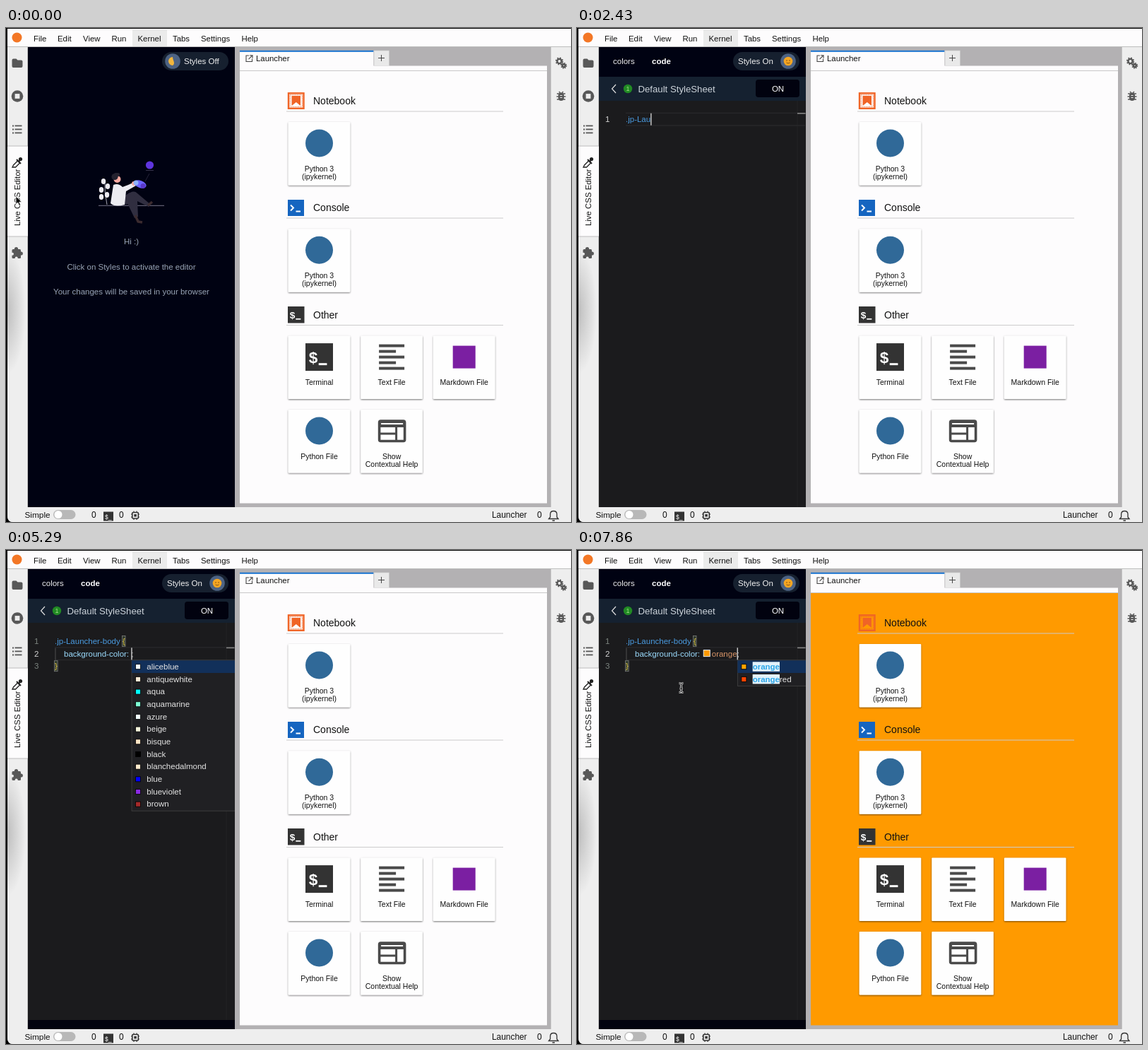
Animation, 800 px wide and 699 px high, one loop 8 s. Source, as an HTML page:

```html
<!DOCTYPE html>
<html lang="en">
<head>
<meta charset="utf-8">
<title>Live CSS Editor</title>
<style>
html, body { margin: 0; width: 100%; height: 100%; overflow: hidden; background: #000; }
svg { display: block; width: 800px; height: 699px; font-family: "Liberation Sans", Arial, sans-serif; font-size: 11.5px; }
text { white-space: pre; }
</style>
</head>
<body>
<svg id="stage" viewBox="0 0 800 699"></svg>
<script>
const LOOP = 8000;
const SIZE = 11.5;
const stage = document.getElementById('stage');
const pen = document.createElement('canvas').getContext('2d');

const rect = (x, y, w, h, fill, extra = '') =>
  `<rect x="${x}" y="${y}" width="${w}" height="${h}" fill="${fill}" ${extra}/>`;
const circle = (x, y, r, fill, extra = '') => `<circle cx="${x}" cy="${y}" r="${r}" fill="${fill}" ${extra}/>`;
const label = (x, y, s, fill, extra = '') => `<text x="${x}" y="${y}" fill="${fill}" ${extra}>${s}</text>`;
const line = (d, stroke, width = 1, extra = '') =>
  `<path d="${d}" fill="none" stroke="${stroke}" stroke-width="${width}" ${extra}/>`;
const shape = (d, fill, extra = '') => `<path d="${d}" fill="${fill}" ${extra}/>`;
const middle = 'text-anchor="middle"';
const size = n => `font-size="${n}"`;

function widthOf(s, bold) {
  pen.font = `${bold ? 'bold ' : ''}${SIZE}px "Liberation Sans", Arial, sans-serif`;
  return pen.measureText(s).width;
}

// ---- window frame ----
function menuBar() {
  const items = [['File', 39], ['Edit', 73], ['View', 109], ['Run', 149.5], ['Kernel', 186.5],
    ['Tabs', 236], ['Settings', 276], ['Help', 333.5]];
  return rect(1, 1, 799, 25, '#fdfcfd') + rect(179, 2, 49, 24, '#ebebeb') +
    circle(15.5, 13.5, 7, '#f37726') +
    items.map(([s, x]) => label(x, 18.5, s, '#111', size(11.4))).join('') +
    rect(1, 26, 799, 1, '#bdbdbd');
}

function gear(x, y, r) {
  return circle(x, y, r, 'none', 'stroke="#555" stroke-width="2.4"') +
    circle(x, y, r + 1.6, 'none', `stroke="#555" stroke-width="1.8" stroke-dasharray="${(r + 1.6) * Math.PI / 8}"`);
}

function sideBars() {
  const ink = '#585858';
  const left =
    rect(1, 27, 30, 651, '#eee') + rect(1, 290, 29, 200, 'url(#shade)') +
    rect(30, 27, 1, 651, '#c4c4c4') +
    rect(1, 167, 30, 128, '#fdfcfd') + rect(1, 166.5, 30, 1, '#bdbdbd') + rect(1, 294.5, 30, 1, '#bdbdbd') +
    shape('M8.5 45.5q0-2 2-2h4l2 2h5q2 0 2 2v6.5q0 2-2 2h-11q-2 0-2-2z', ink) +
    circle(16, 96.5, 8.3, ink) + rect(12.6, 93.1, 6.8, 6.8, '#eee') +
    [138.5, 143.5, 148.5].map(y => rect(9, y - 1, 2, 2, ink) + rect(12.5, y - 1, 10, 1.8, ink)).join('') +
    line('M9 197l1.5-3 6-6 3 3-6 6z', '#222', 1.3) + line('M15 186l6 6M17.5 189.5l3-3', '#222', 2) +
    circle(20.5, 185.5, 2.6, '#222') +
    `<text transform="translate(20 280) rotate(-90)" fill="#111" font-size="11.4">Live CSS Editor</text>` +
    rect(8.5, 313, 12.5, 13, ink, 'rx="1.5"') + circle(14.5, 312.6, 2.6, ink) + circle(21.3, 319, 2.6, ink) +
    circle(9, 319.8, 2, '#eee') + circle(14.7, 325.6, 2, '#eee');
  const right = rect(771, 27, 29, 651, '#eee') + rect(771, 27, 1, 651, '#c4c4c4') +
    gear(783.5, 47, 3.1) + gear(789.8, 53.3, 2) +
    line('M780 93h12M779.5 97h13M780 101h12M783 90l2 2M789 90l-2 2', ink, 1.5) +
    rect(782, 91.5, 8, 11.5, ink, 'rx="4"') + line('M784.5 95.5h3M784.5 98.5h3', '#eee', 1.2);
  return left + right;
}

function statusBar() {
  return rect(1, 678, 799, 21, '#eee') +
    label(26.5, 693, 'Simple', '#111', size(11.8)) +
    rect(67, 682, 31.5, 13, '#b8b8b8', 'rx="6.5"') + circle(74, 688.5, 5.5, '#fff') +
    label(121, 693, '0', '#111', size(12)) + rect(138, 684.5, 14, 13, '#333') +
    label(140, 694.5, '$_', '#fff', size(8.5)) +
    label(160, 693, '0', '#111', size(12)) +
    rect(178.8, 685.5, 8.5, 8.5, 'none', 'stroke="#333" stroke-width="1.6" rx="1"') +
    rect(181.3, 688, 3.5, 3.5, '#333') +
    line('M181 683.5v2M185 683.5v2M181 694v2M185 694v2M177 688h2M177 692h2M187 688h2M187 692h2', '#333', 1.2) +
    label(688, 693, 'Launcher', '#111', size(11.9)) + label(752, 693, '0', '#111', size(12)) +
    line('M768.5 694.5h13.5l-2-2.5v-4q0-4.5-4.7-4.5t-4.7 4.5v4z', '#333', 1.3) +
    line('M773.5 697h3.5', '#333', 1.5);
}

// ---- launcher ----
const prompt = (x, y, s) => rect(x, y, s, s, '#333') +
  label(x + s * 0.12, y + s * 0.72, '$', '#fff', `font-size="${s * 0.58}" font-weight="bold"`) +
  rect(x + s * 0.48, y + s * 0.72, s * 0.3, s * 0.075, '#fff');

const icons = {
  python: (x, y) => circle(x, y, 19.5, '#306998'),
  terminal: (x, y) => prompt(x - 19.5, y - 19.5, 39),
  textFile: (x, y) => [0, 1, 2, 3, 4].map(i => rect(x - 18, y - 18 + i * 8, i % 2 ? 24 : 36, 4, '#4a4a4a')).join(''),
  markdown: (x, y) => rect(x - 16, y - 16, 32, 32, '#7b1fa2'),
  help: (x, y) => rect(x - 17.5, y - 14, 36, 28.5, '#fff', 'rx="2" stroke="#4a4a4a" stroke-width="3.6"') +
    rect(x - 18, y - 14, 37, 9, '#4a4a4a') + rect(x - 15, y - 11, 31, 2, '#fff') +
    line(`M${x - 17} ${y + 4}h23M${x + 6.5} ${y - 7}v21`, '#4a4a4a', 3)
};

function card(col, y, icon, lines) {
  const x = 399.7 + col * 102.6, cx = x + 43.8;
  return rect(x, y, 87.5, 89.5, '#fefefe', 'rx="1" filter="url(#lift)"') + icons[icon](cx, y + 30) +
    lines.map((s, i) => label(cx, y + 69.5 + i * 11.5, s, '#111', `${middle} ${size(10.5)}`)).join('');
}

function heading(y, s) {
  return label(435, y + 5, s, '#111', size(14)) + rect(397, y + 14.5, 307, 1, '#ccc');
}

function launcher() {
  const frame = rect(324, 27, 447, 651, '#b3b1b3') +
    rect(331, 32, 189.5, 23, '#fdfcfd') + rect(331, 31.8, 189.5, 2, '#1a73d0') +
    rect(521, 32, 21.5, 21.5, '#e9e9e9', 'stroke="#c8c8c8" stroke-width=".7"') +
    line('M527 42.5h9M531.5 38v9', '#444', 1) +
    line('M344 39h-4v8.5h8.5v-4M345 38.7h4v4M349 38.7l-5.5 5.5', '#444', 1.1) +
    label(354, 47, 'Launcher', '#111', size(11.4)) +
    rect(331, 53.5, 435, 7.5, '#fdfcfd') + rect(331, 60, 435, 1, '#c8c8c8');
  const body = `<rect id="body" x="331" y="61" width="435" height="611.5"/>`;
  const notebook = rect(400, 92.3, 21.5, 21.5, 'none', 'stroke="#f06426" stroke-width="2.4"') +
    rect(402.3, 94.6, 17, 17, 'none', 'stroke="#f06426" stroke-width="1" stroke-dasharray="1.2 1.2"') +
    shape('M404.5 96h12.5v14l-6.2-5-6.3 5z', '#f06426');
  const console = rect(399, 243, 23, 23, '#1565c0') + line('M403 250.5l4 4-4 4M410.5 259.5h6.5', '#fff', 1.9);
  return frame + body +
    notebook + heading(103, 'Notebook') + card(0, 133, 'python', ['Python 3', '(ipykernel)']) +
    console + heading(254, 'Console') + card(0, 284.3, 'python', ['Python 3', '(ipykernel)']) +
    prompt(399, 394, 23.5) + heading(405.5, 'Other') +
    card(0, 435.6, 'terminal', ['Terminal']) + card(1, 435.6, 'textFile', ['Text File']) +
    card(2, 435.6, 'markdown', ['Markdown File']) +
    card(0, 540, 'python', ['Python File']) + card(1, 540, 'help', ['Show', 'Contextual Help']);
}

// ---- left panel ----
function welcome() {
  const leaf = (x, y) => `<ellipse cx="${x}" cy="${y}" rx="3.2" ry="4" fill="#eceaf0"/>`;
  const art = line('M131 251.3h93', '#777588', 1) +
    line('M143 250q-4-18-3-34', '#cfcdd6', 0.8) +
    leaf(138, 217) + leaf(144, 224) + leaf(135, 229) + leaf(143, 236) + leaf(135, 239) +
    shape('M171 237q9-9 15-3l19 16-3 3-16-8 1 22-5 2-12-25z', '#302e40') +
    shape('M157 250q24 1 29-9l-11-8-9 6z', '#302e40') +
    line('M183 265l4 9 6 1M201 251l6-5', '#3b2b2f', 3.5) +
    shape('M152 222q7-3 13 3l8-3 9-4 2 5-14 8-2 19q-14 4-20-2z', '#ececf1') +
    circle(157.5, 214, 5, '#f7a9a0') + circle(154, 210.5, 4.6, '#24222f') + rect(153, 205, 8, 5, '#24222f', 'rx="2"') +
    circle(181, 220, 3, '#f7a9a0') +
    `<ellipse cx="190" cy="221" rx="9" ry="5" fill="#6c63ff" transform="rotate(20 190 221)"/>` +
    circle(184, 219, 3.5, '#8fb2ff') + circle(194, 223.5, 3.5, '#5a38c8') +
    circle(203.5, 194, 5.6, '#5f35dd') + line('M198 201.5h11', '#35334a', 1) + line('M203 206l-6 11', '#35334a', 0.7);
  const say = (y, s) => label(177.5, y, s, '#98a4b4', middle);
  return art + say(306, 'Hi :)') + say(341.5, 'Click on Styles to activate the editor') +
    say(376.5, 'Your changes will be saved in your browser');
}

function editorHeader() {
  return label(51, 51, 'colors', '#eee') + label(106, 51, 'code', '#fff', 'font-weight="bold"') +
    rect(31, 69, 293, 34, '#152130') + line('M55 80l-5.5 6 5.5 6', '#ddd', 1.2) +
    circle(72, 86, 6.2, '#218a24') + label(72, 89.3, '1', '#a8e08a', `${middle} ${size(9)}`) +
    label(86.5, 90.5, 'Default StyleSheet', '#ccd3da', size(13.2)) +
    rect(253, 73, 62, 25, '#01020f', 'rx="4"') + label(284.5, 90, 'ON', '#fff', middle) +
    rect(31, 103, 293, 575, '#1b1b1d') + rect(311.5, 103, 1, 575, '#242426');
}

function toggle(on, p) {
  const x = 236 + 63 * p;
  const face = on
    ? circle(x, 47, 6.3, '#f5a623') + circle(x - 2, 46, 0.8, '#7a4a10') + circle(x + 2, 46, 0.8, '#7a4a10') +
      line(`M${x - 2.5} 49q2.5 2 5 0`, '#7a4a10', 0.9)
    : shape(`M${x} 41a6 6 0 0 0 0 12q3-2 1.5-6t-1.5-6z`, '#f2b63c');
  return rect(221, 34, 94, 26, '#16202f', 'rx="13"') +
    label(252 - 24 * p, 51, on ? 'Styles On' : 'Styles Off', '#f2f2f2') +
    circle(x, 47, 10.8, '#4d6384') + face;
}

// ---- typing script ----
const SWITCH = 1480;
const SELECTOR = '.jp-Launcher-body';
const PROPERTY = 'background-color';
const properties = ['border', 'background-color', 'background', 'box-sizing', 'border-radius', 'bottom', 'box-shadow',
  'background-image', 'border-bottom', 'background-position', 'border-top', 'border-color'];
const colors = ['aliceblue', 'antiquewhite', 'aqua', 'aquamarine', 'azure', 'beige', 'bisque', 'black',
  'blanchedalmond', 'blue', 'blueviolet', 'brown'];
const warm = ['oldlace', 'olive', 'olivedrab', 'orange', 'orangered', 'orchid'];

const steps = [];
function at(time, change) {
  steps.push({ head: '', brace: false, open: false, prop: '', value: '', list: null, match: '', pick: 0,
    ...steps[steps.length - 1], ...change, time });
}
at(SWITCH, {});
for (let i = 1; i <= SELECTOR.length; i++) at(1750 + i * 97, { head: SELECTOR.slice(0, i) });
at(3620, { head: SELECTOR + ' ' });
at(3820, { brace: true });
at(4070, { open: true });
at(4320, { prop: 'b' });
at(4390, { list: properties, match: 'b' });
at(4830, { pick: 1 });
at(5130, { prop: PROPERTY + ': ', list: null, match: '', pick: 0 });
at(5240, { list: colors });
for (let i = 1; i <= 6; i++) {
  const value = 'orange'.slice(0, i);
  at(5290 + i * 135, { value, match: value, list: warm.filter(c => c.startsWith(value)) });
}

const FIRST_KEY = steps[1].time;
const LAST_KEY = steps[steps.length - 1].time;
const SWATCH = LAST_KEY + 1000;
const BLINK = 600;
const rowY = i => 133 + i * 17.6;

function bracket(x, row, s) {
  return rect(x - 0.5, rowY(row) - 11.5, 4.6, 15, '#2f3a2c', 'stroke="#7d7d7d" stroke-width=".8"') +
    label(x, rowY(row), s, '#e8c84a');
}

function suggestions(step, x) {
  const isColor = step.list !== properties, h = 17.68;
  const rows = step.list.map((name, i) => {
    const y = 156.3 + i * h, tx = x + (isColor ? 21.3 : 20), m = step.match;
    const mw = widthOf(m, true);
    const mark = isColor
      ? rect(x + 5.5, y + 5.4, 7, 7, name, 'stroke="#000" stroke-width=".8"')
      : line(`M${x + 4.5} ${y + 13.5}l6-6`, '#d0d0d0', 3) + line(`M${x + 4.7} ${y + 13.3}l5.5-5.5`, '#222', 1) +
        line(`M${x + 14} ${y + 6.5}a3 3 0 1 1-3-3l-.5 2.7z`, '#d0d0d0', 1.1);
    return (i === step.pick ? rect(x, y, 330 - x, h, '#12305a') : '') + mark +
      (m ? rect(tx, y + 2, mw, 13.5, '#e3f2fb') + label(tx, y + 12.7, m, '#2ba6e8', 'font-weight="bold"') : '') +
      label(tx + (m ? mw : 0), y + 12.7, name.slice(m.length), '#e4e4e4');
  }).join('');
  return rect(x, 156, 330 - x, step.list.length * h + 1, '#202023', 'stroke="#444" stroke-width=".8"') + rows;
}

function editor(t) {
  const step = steps.filter(s => s.time <= t).pop();
  const { head, brace, open, prop, value } = step;
  const active = open ? 1 : 0;
  const y = rowY(active);
  let out = line(`M69 ${y - 12.7}H323M69 ${y + 5}H323`, '#2c2c2f', 1);
  if (head) out += rect(312, y - 13, 11.5, 1.6, '#858585');
  for (let i = 0; i < (open ? 3 : 1); i++) out += label(40, rowY(i), i + 1, i === active ? '#d4d4d4' : '#7d8580');
  out += label(69, rowY(0), head, '#4a9be0');
  const headEnd = 69 + widthOf(head);
  if (brace) out += bracket(headEnd, 0, '{') + (open ? bracket(69, 2, '}') : bracket(headEnd + 4, 0, '}'));
  let caret = headEnd + (brace ? 4 : 0);
  if (open) {
    const swatch = t >= SWATCH ? 13.5 : 0;
    const valueX = 82 + widthOf(prop);
    caret = valueX + swatch + widthOf(value);
    out += rect(69.5, y - 12, 0.9, 17, '#555') + rect(31, 665, 293, 13, '#02030f') +
      label(82, y, prop, prop === 'b' ? '#d4d4d4' : '#9cdcfe') +
      label(valueX + swatch, y, value, '#d79467');
    if (prop.includes(':')) out += label(caret, y, ';', '#d4d4d4');
    if (swatch) out += rect(valueX + 2, y - 9, 9, 9, '#ff9a00', 'stroke="#eee" stroke-width="1"');
  }
  if (step.list) out += suggestions(step, caret + 0.8);
  if (Math.floor((t - step.time) / BLINK) % 2 === 0) out += rect(caret, y - 12.3, 1.4, 17, '#d0d0d0');
  return out;
}

// ---- pointer ----
const ease = p => p * p * (3 - 2 * p);
const progress = (t, from, to) => Math.min(1, Math.max(0, (t - from) / (to - from)));
const beam = 'M-3-6.5q3 0 3 2v9q0 2-3 2M3-6.5q-3 0-3 2v9q0 2 3 2M-2 1h4';

const pointers = {
  arrow: shape('M0 0v11.5l2.7-2.5 2 4.5 2-1-2-4.3h3.7z', '#000', 'stroke="#fff" stroke-width=".9"'),
  hand: shape('M3 1.5q1.7-1 2 .7v4l5 1q1.5.5 1.3 2.300l-.8 4.5h-6l-4-5q0-1.7 1.7-1l1 .8z', '#fff', 'stroke="#000" stroke-width="1.1"'),
  beam: line(beam, '#fff', 2.6) + line(beam, '#000', 1)
};

// Typing hides the pointer until the mouse moves again.
function pointer(t) {
  if (t >= FIRST_KEY && t < 7350) return '';
  const p = t < FIRST_KEY ? 1 - ease(progress(t, 200, 1220)) : ease(progress(t, 7350, 7860));
  const [toX, toY] = t < FIRST_KEY ? [14, 238] : [147.5, 195];
  const x = 250 + (toX - 250) * p, y = 43 + (toY - 43) * p;
  const kind = x > 221 && y < 60 ? 'hand' : t > FIRST_KEY && y > 103 ? 'beam' : 'arrow';
  return `<g transform="translate(${x} ${y})">${pointers[kind]}</g>`;
}

// ---- assembly ----
stage.innerHTML = `<defs>
  <radialGradient id="shade" gradientUnits="userSpaceOnUse" cx="0" cy="0" r="1" gradientTransform="translate(1 400) scale(27 90)">
    <stop stop-color="#bdbdbd"/><stop offset="1" stop-color="#eee"/></radialGradient>
  <filter id="lift" x="-10%" y="-10%" width="120%" height="125%"><feDropShadow dx="0" dy="1" stdDeviation="1.3" flood-opacity=".55"/></filter>
  <clipPath id="window"><path d="M2 1h798v698H10q-8 0-8-9z"/></clipPath>
  <clipPath id="panel"><rect x="31" y="27" width="293" height="651"/></clipPath>
</defs>
<g clip-path="url(#window)">${rect(0, 0, 800, 699, '#eee')}${menuBar()}${launcher()}${sideBars()}${statusBar()}
  <g clip-path="url(#panel)">${rect(31, 27, 293, 651, '#000212')}
    <g id="welcome">${welcome()}</g><g id="header">${editorHeader()}</g><g id="code"></g><g id="toggle"></g>
  </g></g><g id="pointer"></g>`;

const part = id => document.getElementById(id);
const drawn = {};
function put(id, markup) {
  if (drawn[id] !== markup) part(id).innerHTML = drawn[id] = markup;
}

function render() {
  const t = performance.now() % LOOP;
  const on = t >= SWITCH;
  part('welcome').setAttribute('visibility', on ? 'hidden' : 'visible');
  part('header').setAttribute('visibility', on ? 'visible' : 'hidden');
  part('body').setAttribute('fill', t >= LAST_KEY ? '#ff9a00' : '#fdfcfd');
  put('code', on ? editor(t) : '');
  put('toggle', toggle(on, progress(t, SWITCH, SWITCH + 280)));
  put('pointer', pointer(t));
  requestAnimationFrame(render);
}
render();
</script>
</body>
</html>
```
